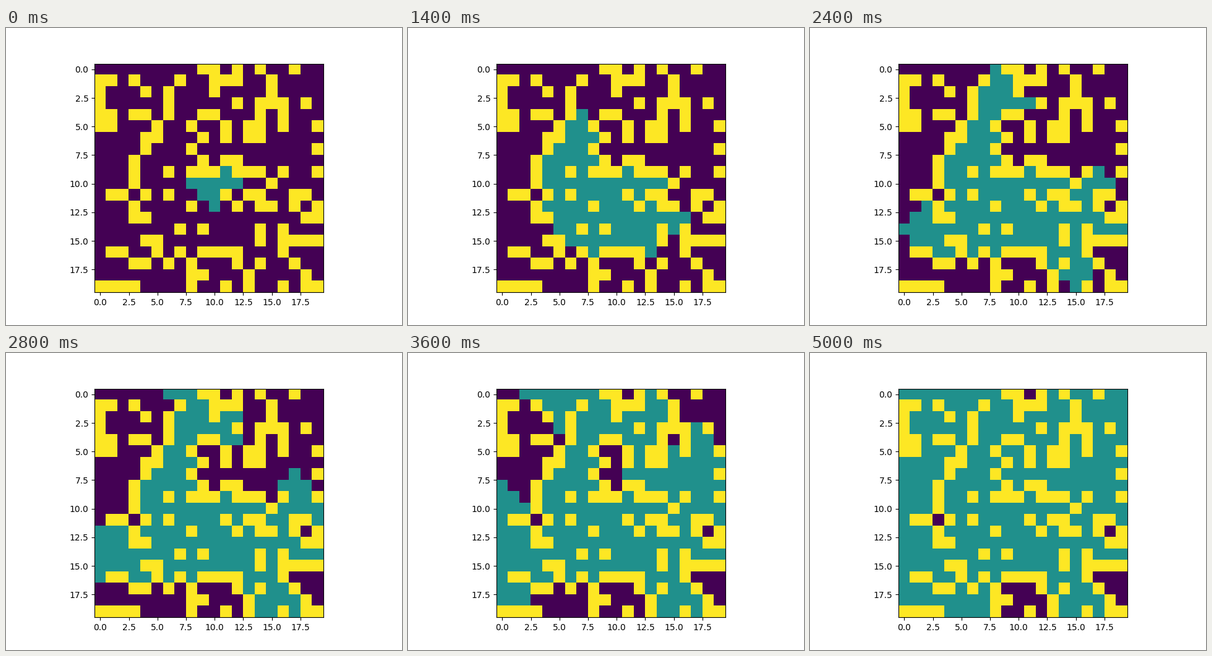
Animation, 640 px wide and 480 px high, one loop 8 s. Source, as a matplotlib script:

```python
"""Flood fill spreading through a walled grid, one step per frame."""
import matplotlib.pyplot as plt
import numpy as np
from matplotlib.animation import FuncAnimation

SIZE = 20
START = (10, 10)
FIRST_REACH = 2
FRAMES, INTERVAL = 40, 200
EMPTY, FILLED, WALL = 0, 1, 2

# Columns that hold a wall, row by row
WALLS = [
    [9, 10, 12, 14, 17],
    [0, 1, 3, 7, 10, 11, 12, 15],
    [0, 4, 6, 10, 15],
    [0, 6, 12, 14, 15, 16, 18],
    [0, 1, 3, 4, 6, 9, 10, 14, 16],
    [0, 1, 5, 8, 11, 13, 14, 16, 19],
    [4, 5, 9, 11, 13, 14],
    [4, 8, 19],
    [3, 9, 11, 12],
    [3, 6, 8, 9, 10, 12, 13, 14, 16, 19],
    [3, 15],
    [1, 2, 4, 6, 11, 13, 14, 17, 18],
    [3, 8, 12, 14, 15, 17, 19],
    [3, 4, 18, 19],
    [7, 9, 14, 16],
    [4, 5, 14, 16, 17, 18, 19],
    [1, 2, 5, 7, 9, 10, 11, 12, 16],
    [3, 4, 6, 8, 12, 14, 17],
    [8, 9, 13, 18],
    [0, 1, 2, 3, 8, 11, 13, 16, 18, 19],
]


def build_grid():
    grid = np.full((SIZE, SIZE), EMPTY)
    for row, columns in enumerate(WALLS):
        grid[row, columns] = WALL
    return grid


def step_distances(grid, start):
    """Steps from start to every cell by breadth-first search."""
    distance = np.full(grid.shape, np.inf)
    distance[start] = 0
    queue = [start]
    for row, col in queue:
        for dr, dc in ((1, 0), (-1, 0), (0, 1), (0, -1)):
            cell = r, c = row + dr, col + dc
            inside = 0 <= r < SIZE and 0 <= c < SIZE
            if inside and grid[cell] != WALL and np.isinf(distance[cell]):
                distance[cell] = distance[row, col] + 1
                queue.append(cell)
    return distance


grid = build_grid()
distance = step_distances(grid, START)


def filled_grid(frame):
    return np.where(distance <= FIRST_REACH + frame, FILLED, grid)


fig, ax = plt.subplots(figsize=(6.4, 4.8), dpi=100)
image = ax.imshow(filled_grid(0), cmap="viridis", vmin=EMPTY, vmax=WALL)


def update(frame):
    image.set_data(filled_grid(frame))
    return [image]


anim = FuncAnimation(fig, update, frames=FRAMES, interval=INTERVAL,
                     repeat=True, repeat_delay=0)
plt.show()
```
